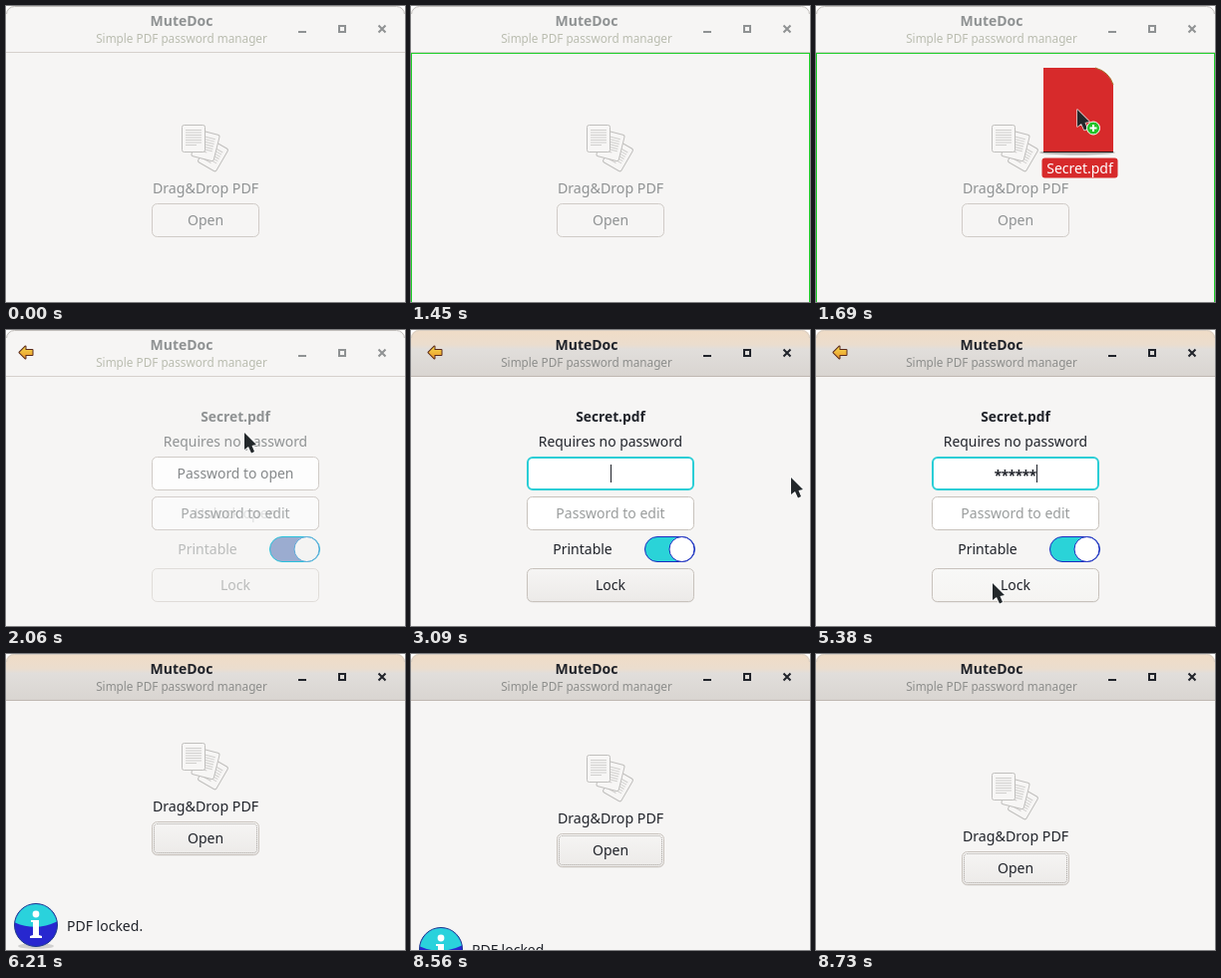
These frames come from a looping animation (400x297 px, 9.67 s). An HTML page with a canvas:

```html
<!DOCTYPE html>
<html lang="en">
<head>
<meta charset="utf-8">
<title>PDF password manager</title>
<style>
html, body { margin: 0; height: 100%; overflow: hidden; background: #fff; }
canvas { display: block; width: 100vw; height: 100vh; }
</style>
</head>
<body>
<canvas id="stage" width="400" height="297"></canvas>
<script>
const ctx = document.getElementById('stage').getContext('2d');
const LOOP = 9670, W = 400, H = 297;
const FONT = '"Noto Sans", "Open Sans", sans-serif';
const KEY_TIMES = [3460, 3660, 3790, 4000, 4160, 4310];

const clamp = v => Math.max(0, Math.min(1, v));
const lerp = (a, b, k) => a + (b - a) * k;
const span = (t, from, to) => clamp((t - from) / (to - from));
const easeOut = u => 1 - (1 - u) ** 3;
const easeInOut = u => u * u * (3 - 2 * u);

// Pointer path: start, end, from x, from y, to x, to y, easing
const MOVES = [
  [1440, 1910, 467, 113, 239, 103, easeOut],
  [2320, 2590, 239, 103, 226, 131, easeInOut],
  [2700, 3090, 226, 131, 381, 148, easeInOut],
  [4940, 5380, 381, 148, 177, 254, easeInOut],
  [5890, 6200, 177, 254, 372, 187, easeInOut]
];

let focus = 0;

// Colour between the unfocused and focused window states
function tone(idle, active) {
  const part = (c, i) => parseInt(c.substr(1 + i * 2, 2), 16);
  const rgb = [0, 1, 2].map(i => Math.round(lerp(part(idle, i), part(active, i), focus)));
  return `rgb(${rgb})`;
}
const ink = () => tone('#8f9293', '#20232a');
const edge = () => tone('#d0cbc7', '#c8c2bc');

function text(str, x, y, color, { size = 14, weight = 400, align = 'center' } = {}) {
  ctx.font = `${weight} ${size}px ${FONT}`;
  ctx.textAlign = align;
  ctx.fillStyle = color;
  ctx.fillText(str, x, y);
}

function box(x, y, w, h, r, fill, stroke, line = 1) {
  ctx.beginPath();
  ctx.roundRect(x + line / 2, y + line / 2, w - line, h - line, r);
  if (fill) { ctx.fillStyle = fill; ctx.fill(); }
  if (stroke) { ctx.strokeStyle = stroke; ctx.lineWidth = line; ctx.stroke(); }
}

function disc(x, y, r, fill, stroke) {
  ctx.beginPath();
  ctx.arc(x, y, r, 0, Math.PI * 2);
  ctx.fillStyle = fill;
  ctx.fill();
  if (stroke) { ctx.strokeStyle = stroke; ctx.lineWidth = 1; ctx.stroke(); }
}

function polygon(points, fill, stroke, line = 1) {
  ctx.beginPath();
  points.forEach(([x, y]) => ctx.lineTo(x, y));
  ctx.closePath();
  ctx.lineJoin = 'round';
  ctx.lineWidth = line;
  if (stroke) { ctx.strokeStyle = stroke; ctx.stroke(); }
  ctx.fillStyle = fill;
  ctx.fill();
}

function faded(alpha, draw) {
  if (alpha <= 0) return;
  ctx.save();
  ctx.globalAlpha *= alpha;
  draw();
  ctx.restore();
}

function shifted(x, y, draw) {
  ctx.save();
  ctx.translate(Math.round(x), Math.round(y));
  draw();
  ctx.restore();
}

function button(x, y, w, label, { state = 'normal', ring = false } = {}) {
  const shades = {
    normal: ['#f6f5f4', '#eceae8'],
    hover: ['#f8f8f7', '#f5f4f2'],
    pressed: ['#d6d1cd', '#d6d1cd']
  }[state];
  const fill = ctx.createLinearGradient(0, y, 0, y + 34);
  fill.addColorStop(0, tone('#f6f5f4', shades[0]));
  fill.addColorStop(1, tone('#f6f5f4', shades[1]));
  if (focus > 0) faded(focus * 0.08, () => box(x, y + 1, w, 34, 5, '#000000'));
  box(x, y, w, 34, 5, fill, edge());
  if (ring) {
    ctx.setLineDash([1, 1]);
    box(x + 2, y + 2, w - 4, 30, 3, null, '#a5a19d');
    ctx.setLineDash([]);
  }
  text(label, x + w / 2, y + 22, ink());
}

function windowControls() {
  const color = ink();
  ctx.fillStyle = color;
  ctx.fillRect(293, 25, 8, 2);
  ctx.strokeStyle = color;
  ctx.lineWidth = 2;
  ctx.strokeRect(334, 20, 6, 6);
  ctx.beginPath();
  ctx.moveTo(373.5, 19.5); ctx.lineTo(380.5, 26.5);
  ctx.moveTo(380.5, 19.5); ctx.lineTo(373.5, 26.5);
  ctx.stroke();
}

function backArrow() {
  const fill = ctx.createLinearGradient(0, 16, 0, 29);
  fill.addColorStop(0, '#f7dc4c');
  fill.addColorStop(1, '#e8932a');
  polygon([[17.5, 22.5], [23.5, 16.5], [23.5, 20], [30.5, 20], [30.5, 25], [23.5, 25], [23.5, 28.5]],
    fill, '#5c2a1a', 2);
}

function header(backShown) {
  ctx.fillStyle = '#f6f5f4';
  ctx.fillRect(0, 0, W, 47);
  faded(focus, () => {
    const fill = ctx.createLinearGradient(0, 0, 0, 46);
    [[0, '#f0dcc6'], [0.32, '#ebddce'], [0.42, '#e1dedb'], [1, '#d9d5d1']]
      .forEach(([at, color]) => fill.addColorStop(at, color));
    ctx.fillStyle = fill;
    ctx.fillRect(0, 0, W, 46);
  });
  ctx.fillStyle = tone('#d5d0cc', '#bfb8b1');
  ctx.fillRect(0, 46, W, 1);
  text('MuteDoc', 176, 20, ink(), { weight: 700 });
  text('Simple PDF password manager', 176, 37, tone('#babdb0', '#8d8e8c'), { size: 11.75 });
  windowControls();
  if (backShown > 0) shifted(-55 * (1 - backShown), 0, backArrow);
}

function sheet(x, y, w, h, angle) {
  ctx.save();
  ctx.translate(x, y);
  ctx.rotate(angle * Math.PI / 180);
  box(-w / 2, -h / 2, w, h, 2, '#f7f6f5', '#c0bfbd');
  ctx.fillStyle = '#d0cfcd';
  for (let i = 0; i < 7; i++) {
    ctx.fillRect(-w / 2 + 4, -Math.floor(h / 2) + 5 + i * 2.5, i === 6 ? w - 13 : w - 8, 1);
  }
  ctx.restore();
}

function dropPage(ring) {
  sheet(207.5, 150, 22, 27, 30);
  sheet(200, 140, 24, 28, 14);
  sheet(188, 133, 24, 28, 0);
  text('Drag&Drop PDF', 200, 188, ink(), { size: 14.2 });
  button(146, 198, 108, 'Open', { ring });
}

function toggle() {
  box(234, 207, 51, 26, 13, tone('#9aabd0', '#2ad3d8'), tone('#27c2dc', '#1c2cc0'));
  disc(271.5, 220, 12.5, tone('#f6f5f4', '#ffffff'), tone('#5aa8d8', '#1c2cc0'));
}

function lockPage(t, reveal) {
  const placeholder = tone('#85888a', '#9a9d9d');
  const active = t >= 2730;
  text('Secret.pdf', 200, 92, ink(), { size: 13.8, weight: 700 });
  text('Requires no password', 200, 117, ink(), { size: 13.9 });

  if (active) {
    box(116, 127, 168, 34, 5, '#ffffff', tone('#d5d0cc', '#2bced6'), 2);
    const typed = KEY_TIMES.filter(k => t >= k).length;
    for (let i = 0; i < typed; i++) {
      text('*', 200 + 7 * (i - (typed - 1) / 2), 151, '#20232a', { size: 13.5, weight: 600 });
    }
    ctx.fillStyle = '#20232a';
    ctx.fillRect(Math.round(200 + typed * 3.5), 135, 1, 18);
  } else {
    box(116, 127, 168, 34, 5, '#fdfdfd', edge());
    text('Password to open', 200, 149, placeholder, { size: 13.9 });
  }

  // The entry fades in over the button it replaces
  if (reveal < 1) button(116, 167, 168, 'Unlock open');
  faded(Math.min(1, reveal * 1.25), () => {
    box(116, 167, 168, 34, 5, tone('#fcfcfc', '#ffffff'), edge());
    text('Password to edit', 200, 189, placeholder);
  });
  faded(reveal, () => text('Printable', 172, 225, ink()));
  faded(Math.min(1, reveal * 1.7), toggle);
  const state = t >= 5510 ? 'pressed' : t >= 5290 ? 'hover' : 'normal';
  faded(reveal, () => button(116, 239, 168, 'Lock', { state }));
}

function infoBar() {
  faded(0.15, () => {
    ctx.beginPath();
    ctx.ellipse(30, 293, 18, 3, 0, 0, Math.PI * 2);
    ctx.fillStyle = '#000';
    ctx.fill();
  });
  ctx.save();
  disc(30, 272, 21.5, '#2727cf', '#1d3a8c');
  ctx.beginPath();
  ctx.arc(30, 272, 21, 0, Math.PI * 2);
  ctx.clip();
  ctx.beginPath();
  ctx.moveTo(8, 250);
  ctx.lineTo(52, 250);
  ctx.lineTo(52, 268);
  ctx.quadraticCurveTo(30, 279, 8, 269);
  ctx.fillStyle = '#2ad2dc';
  ctx.fill();
  ctx.restore();
  disc(30, 261, 3.4, '#ffffff');
  polygon([[25, 267], [33, 267], [33, 282], [36, 283], [36, 285], [24, 285], [24, 283], [27, 282], [27, 269], [25, 269]],
    '#ffffff');
  text('PDF locked.', 61, 278, ink(), { align: 'left' });
}

function dropHighlight() {
  ctx.fillStyle = '#1fd02a';
  ctx.fillRect(0, 47, W, 1);
  ctx.fillRect(0, 47, 1, H - 47);
  ctx.fillRect(W - 1, 47, 1, H - 47);
}

function draggedFile() {
  faded(0.25, () => {
    ctx.beginPath();
    ctx.ellipse(0, 43, 38, 2.5, 0, 0, Math.PI * 2);
    ctx.fillStyle = '#000';
    ctx.fill();
  });
  ctx.beginPath();
  ctx.moveTo(-34, -42);
  ctx.lineTo(18, -42);
  ctx.quadraticCurveTo(32, -38, 36, -25);
  ctx.lineTo(36, 43);
  ctx.lineTo(-34, 43);
  ctx.closePath();
  ctx.fillStyle = '#d72a2b';
  ctx.fill();
  ctx.beginPath();
  ctx.moveTo(18, -42);
  ctx.quadraticCurveTo(32, -38, 36, -25);
  ctx.strokeStyle = '#a8702a';
  ctx.lineWidth = 1;
  ctx.stroke();
  ctx.fillStyle = '#2a1a1a';
  ctx.fillRect(-34, 42, 70, 1);
  box(-36, 48, 77, 21, 3, '#d72a2b');
  text('Secret.pdf', 2.5, 64, '#ffffff');
}

function pointer(adding) {
  polygon([[0, 0], [0, 17], [4, 14], [7, 20.5], [10, 19], [7.5, 13], [12, 12]],
    '#23282b', adding ? '#e9d9d6' : '#ffffff', 1.5);
  if (!adding) return;
  disc(16, 18.5, 6.5, '#22c32a', '#ffffff');
  ctx.fillStyle = '#ffffff';
  ctx.fillRect(12.5, 17.5, 7, 2);
  ctx.fillRect(15, 15, 2, 7);
}

function pointerAt(t) {
  const [from, to, x0, y0, x1, y1, ease] = MOVES.filter(m => t >= m[0]).pop();
  const u = ease(span(t, from, to));
  return [lerp(x0, x1, u), lerp(y0, y1, u)];
}

function render(t) {
  focus = easeOut(span(t, 2710, 2910));
  const opening = span(t, 1922, 2162);
  const slide = easeOut(opening) - easeOut(span(t, 5550, 5790));
  const info = easeOut(span(t, 5550, 5790)) - easeOut(span(t, 8530, 8730));
  const dragging = t >= 1450 && t < 1910;

  ctx.clearRect(0, 0, W, H);
  ctx.save();
  ctx.beginPath();
  ctx.roundRect(0, 0, W, H + 20, 8);
  ctx.clip();
  ctx.fillStyle = '#f6f5f4';
  ctx.fillRect(0, 0, W, H);

  if (slide < 1) shifted(-W * slide, -30 * info, () => dropPage(t >= 5510));
  if (slide > 0) shifted(W * (1 - slide), 0, () => lockPage(t, opening));
  if (info > 0) shifted(0, 60 * (1 - info), infoBar);

  header(slide);
  ctx.restore();

  ctx.save();
  ctx.beginPath();
  ctx.rect(0, 0, W, 8);
  ctx.clip();
  box(0, 0, W, H, 8, null, tone('#c2bfbc', '#d8cec3'));
  ctx.restore();

  if (dragging) dropHighlight();
  if (t >= 1450 && t < 6210) {
    const [x, y] = pointerAt(t);
    shifted(x, y, () => {
      if (dragging) draggedFile();
      pointer(dragging);
    });
  }
}

function tick() {
  render(performance.now() % LOOP);
  requestAnimationFrame(tick);
}
tick();
</script>
</body>
</html>
```
